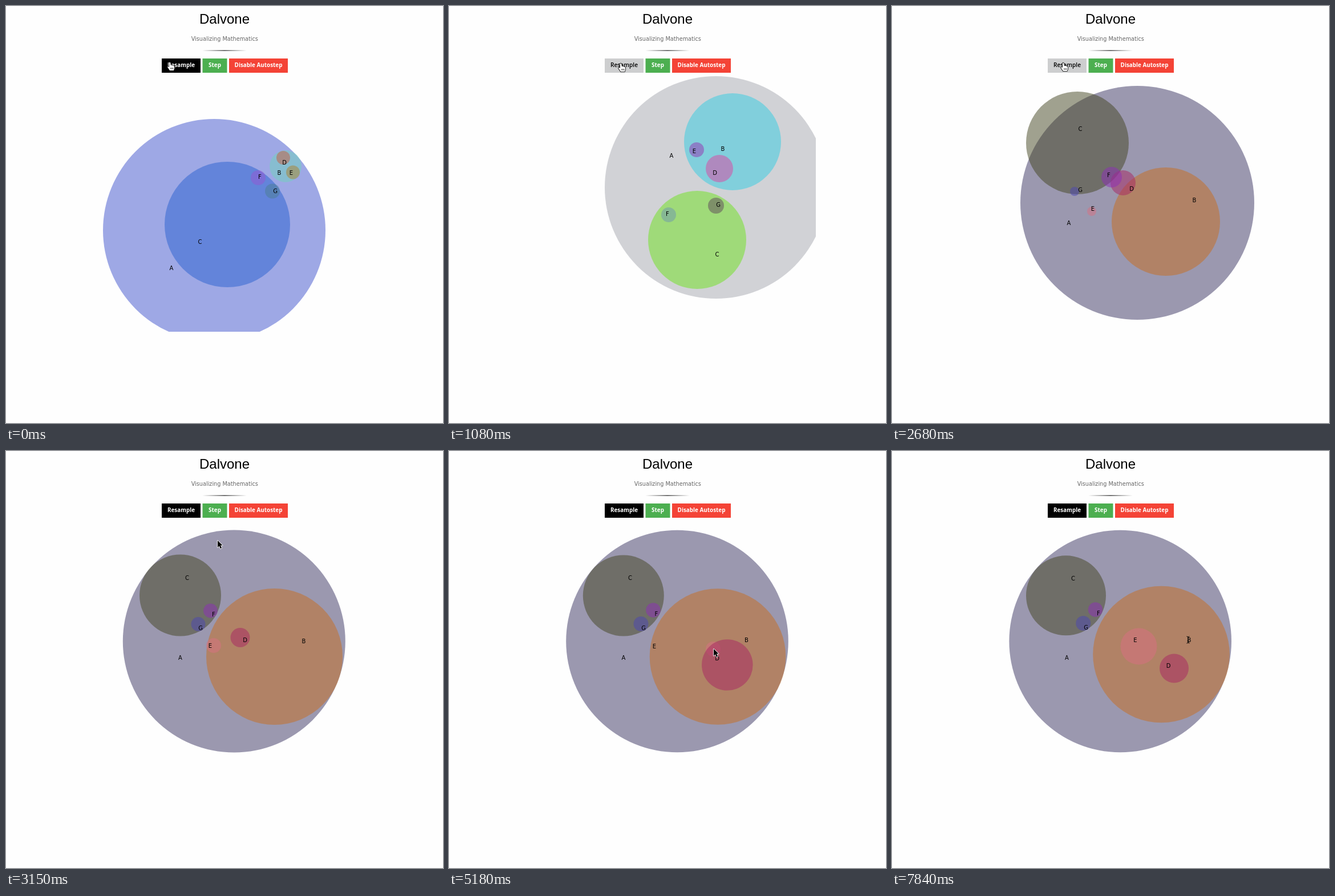
Animation of 766x731 px, one loop 8 s. Source, as an HTML page with a canvas:

```html
<!DOCTYPE html>
<html lang="en">
<head>
<meta charset="utf-8">
<title>Set diagrams</title>
<style>
html, body { margin: 0; width: 100%; height: 100%; overflow: hidden; background: #fefefe; }
canvas { display: block; }
</style>
</head>
<body>
<canvas id="stage" width="766" height="731"></canvas>
<script>
const ctx = document.getElementById('stage').getContext('2d');
const LOOP = 8000;
const ORDER = 'ABCEDFG';
const SANS = '"DejaVu Sans", sans-serif';
const BUTTON = '"Open Sans", sans-serif';

// Bursts of picture changes: first, last, count
const bursts = [
  [0, 0, 1], [50, 50, 1], [200, 630, 6], [720, 990, 4], [1080, 1080, 1], [1760, 2050, 4],
  [2680, 3070, 5], [3150, 3460, 5], [3520, 4280, 12], [4340, 4770, 8],
  [5010, 5120, 3], [5180, 5810, 10], [5870, 6480, 10], [6550, 6600, 2],
  [6690, 7490, 14], [7540, 7840, 6]
];

// Each set: circle x, y, radius, label x, y
const blueSet = {
  A: [365, 393, 195, 290, 459], B: [490, 281, 28, 479, 292], C: [388, 383, 110, 340, 413],
  D: [486, 266, 12, 488, 274], E: [503, 291.5, 12, 500, 292],
  F: [442, 301, 13, 445, 299], G: [467, 324.5, 13, 472, 324]
};
const greySet = {
  A: [481, 311, 204, 397, 251], B: [501, 243.5, 90, 470, 254], C: [448.5, 416.5, 98.5, 499.5, 442],
  D: [474.5, 302.5, 39.5, 451.5, 316], E: [414.5, 298, 4, 409, 304],
  F: [390.5, 318, 2, 387, 314], G: [483, 329.5, 18, 487.5, 318]
};
const greySolved = {
  A: [468, 318, 195, 390, 262], B: [497, 238, 85, 480, 250], C: [435, 410, 86, 470, 435],
  D: [474, 285, 24, 466, 292], E: [434, 252, 13, 430, 254],
  F: [385, 366, 13, 383, 364], G: [468, 350, 14, 472, 348]
};
const tealSet = {
  A: [280, 298, 218, 336, 409], B: [293, 348, 110, 308, 247], C: [358, 228.5, 152.5, 471, 197],
  D: [349, 436, 9.5, 353, 485], E: [246, 345, 0, 246, 345],
  F: [323, 203, 13.5, 312, 207], G: [351, 291.5, 67.5, 424, 271]
};
const tealSolved = {
  A: [331, 321, 195, 355, 460], B: [265, 365, 100, 280, 310], C: [400, 245, 75, 445, 225],
  D: [318, 405, 16, 320, 410], E: [235, 350, 13, 238, 349],
  F: [365, 222, 14, 360, 224], G: [412, 272, 30, 420, 272]
};
const brownSet = {
  A: [430, 345, 205, 310, 380], B: [480, 378, 95, 530, 340], C: [325, 240, 90, 330, 215],
  D: [405, 310, 22, 420, 320], E: [350, 360, 8, 352, 355],
  F: [385, 300, 18, 380, 296], G: [320, 325, 8, 330, 322]
};
const brownSolved = {
  A: [399.8, 333.5, 195, 305.5, 362], B: [470.5, 360.5, 119.5, 522, 333.5], C: [305.5, 253, 71.5, 317.5, 222.5],
  D: [410.5, 327, 17, 419, 331], E: [364, 341, 13, 358, 341.5],
  F: [358.5, 280, 12.5, 364, 286.5], G: [337, 303.5, 12.5, 341, 310.5]
};
const bigD = {
  ...brownSolved, A: [400, 333.5, 194.8, 306, 362], B: [471, 360.5, 119.3, 521.5, 331.5],
  C: [305.8, 253.5, 71, 317.5, 222.5], D: [487.8, 375, 44.8, 470, 363], E: [371, 342, 13, 360, 342.5],
  F: [358, 279, 12.8, 363.5, 285.5], G: [336.5, 303, 13, 341, 310]
};
const withE = (x, y, lx = 360, ly = 342.5) => ({ ...bigD, E: [x, y, 13, lx, ly] });
const dragE = [withE(434, 345), withE(463, 347), withE(480, 352), withE(446, 326, 443, 331)];
const apart = {
  ...bigD, A: [400.3, 333.5, 195, 306.5, 362], B: [470.5, 355.5, 122, 521.5, 331.5],
  C: [304.3, 252.5, 69.5, 317.5, 223], D: [492, 380.5, 30, 481, 373.5], E: [417.5, 300, 30.5, 417.5, 318],
  F: [357, 278.5, 11.7, 363, 285.5], G: [336, 301.5, 12, 340.5, 310]
};
const settled = {
  ...apart, A: [400.2, 333.5, 194.8, 306.5, 362], B: [472, 356.5, 119.8, 521, 331.5],
  C: [305, 253.3, 70, 317.5, 223], D: [494.5, 381, 25.5, 484.5, 376], E: [432.5, 342.5, 32, 426.5, 331],
  F: [356.5, 278, 12.7, 362, 284.5], G: [335.3, 302, 13, 340, 309]
};

// RGB per set, in the order A to G; every disc is half transparent
const blueTones = ['64,84,206', '115,211,188', '43,99,208', '199,92,59', '173,130,43', '149,86,209', '75,126,145'];
const greyTones = ['166,168,176', '50,205,227', '110,227,31', '222,68,161', '150,50,175', '110,150,175', '94,70,89'];
const tealTones = ['106,174,186', '156,110,108', '204,144,140', '20,140,175', '120,150,90', '112,135,188', '60,53,100'];
const brownTones = ['58,52,98', '200,111,30', '68,71,34', '168,38,99', '218,112,129', '142,46,183', '76,70,179'];

// start, end, from, to, ease-out power, tones
const moves = [
  [0, 1, blueSet, blueSet, 1, blueTones],
  [720, 1080, greySet, greySolved, 2, greyTones],
  [1760, 2050, tealSet, tealSolved, 2, tealTones],
  [2680, 3150, brownSet, brownSolved, 3, brownTones],
  [3460, 4160, brownSolved, bigD, 1, brownTones],
  [4280, 4770, bigD, dragE[0], 1, brownTones],
  [4950, 5180, dragE[0], dragE[1], 1, brownTones],
  [5180, 5450, dragE[1], dragE[2], 1, brownTones],
  [5450, 5810, dragE[2], dragE[3], 1, brownTones],
  [5810, 6550, dragE[3], apart, 2, brownTones],
  [6690, 7400, apart, settled, 1, brownTones]
];

// time, x, y of the pointer tip
const pointer = [
  [0, 287, 99], [200, 287, 99], [630, 302, 101], [720, 302, 102], [1080, 301, 101],
  [1760, 300, 100], [2680, 300, 100], [2950, 330, 110], [3150, 371, 157], [3460, 412, 328],
  [3520, 412, 328], [4100, 487, 376], [4280, 372, 341], [4770, 435, 345], [4950, 435, 345],
  [5180, 464, 347], [5450, 481, 352], [5810, 446, 326], [6200, 440, 315], [6550, 456, 300],
  [6690, 456, 300], [6850, 420, 302], [7200, 434, 344], [7490, 548, 331], [7840, 519, 331]
];

const clamp = u => Math.max(0, Math.min(1, u));
const mix = (a, b, u) => a.map((v, i) => v + (b[i] - v) * u);

function heldTime(t) {
  const [first, last, n] = bursts.filter(b => b[0] <= t).pop();
  if (n === 1) return first;
  const gap = (last - first) / (n - 1);
  return first + gap * Math.min(n - 1, Math.floor((t - first) / gap + 1e-6));
}

function pointerAt(t) {
  const i = pointer.findIndex(p => p[0] > t);
  if (i < 0) return pointer[pointer.length - 1].slice(1);
  const a = pointer[i - 1], b = pointer[i];
  return mix(a, b, (t - a[0]) / (b[0] - a[0])).slice(1);
}

function write(text, x, y, font, color) {
  ctx.font = font;
  ctx.fillStyle = color;
  ctx.fillText(text, x, y);
}

function drawHeader(hover) {
  write('Dalvone', 383, 31, '24px "Liberation Sans", Arial, sans-serif', '#000');
  write('Visualizing Mathematics', 383.3, 61, '9.7px ' + SANS, '#666');
  const line = ctx.createLinearGradient(344, 0, 422, 0);
  line.addColorStop(0, 'rgba(0,0,0,0)');
  line.addColorStop(0.5, 'rgba(0,0,0,.9)');
  line.addColorStop(1, 'rgba(0,0,0,0)');
  ctx.fillStyle = line;
  ctx.fillRect(344, 77.5, 78, 1.2);

  const button = (x, w, label, fill, color = '#fff', face = '700 9.9px ') => {
    ctx.fillStyle = fill;
    ctx.fillRect(x, 92, w, 25);
    write(label, x + w / 2, 107.3, face + BUTTON, color);
  };
  if (hover) button(273, 68, 'Resample', '#cdcecf', '#000', '600 10.2px ');
  else button(273, 68, 'Resample', '#000');
  button(344.5, 43, 'Step', '#4caf50');
  button(391, 103, 'Disable Autostep', '#f44336');
}

function drawSets(t) {
  const [start, end, from, to, power, tones] = moves.filter(m => m[0] <= t).pop();
  const u = 1 - (1 - clamp((t - start) / (end - start))) ** power;
  ctx.save();
  ctx.beginPath();
  ctx.rect(124, 117, 519, 454);
  ctx.clip();
  for (const name of ORDER) {
    const [x, y, r, lx, ly] = mix(from[name], to[name], u);
    ctx.fillStyle = `rgba(${tones['ABCDEFG'.indexOf(name)]},.5)`;
    ctx.beginPath();
    ctx.arc(x, y, r, 0, Math.PI * 2);
    ctx.fill();
    write(name, lx, ly + 3.5, '10px ' + SANS, '#000');
  }
  ctx.restore();
}

function outline(d, x, y, fill, stroke, width) {
  const path = new Path2D(d);
  ctx.save();
  ctx.translate(x, y);
  ctx.lineJoin = 'round';
  ctx.lineWidth = width;
  ctx.strokeStyle = stroke;
  ctx.stroke(path);
  ctx.fillStyle = fill;
  ctx.fill(path);
  ctx.restore();
}

function drawHand(x, y) {
  outline('M-1 0Q0-1 1 0L2 5L4 4.5L5.5 5.5L7 5.5L8 7Q9 10 7 14H0L-4 8Q-3 6-1 8Z', x, y, '#fff', '#000', 1.6);
  ctx.fillStyle = '#000';
  for (const dx of [1.5, 3.5, 5.5]) ctx.fillRect(x + dx, y + 9, 0.7, 3);
}

function drawArrow(x, y) {
  outline('M0 0V12L2.8 9.4L4.8 14L7 13L5 8.6H8.6Z', x, y, '#000', '#fff', 1.6);
}

function drawBeam(x, y) {
  ctx.lineWidth = 1;
  ctx.strokeStyle = '#000';
  ctx.stroke(new Path2D(`M${x - 2.5} ${y - 6}Q${x} ${y - 6} ${x} ${y - 4}V${y + 4}Q${x} ${y + 6} ${x - 2.5} ${y + 6}`
    + `M${x + 2.5} ${y - 6}Q${x} ${y - 6} ${x} ${y - 4}M${x} ${y + 4}Q${x} ${y + 6} ${x + 2.5} ${y + 6}`
    + `M${x - 1.5} ${y + 2}H${x + 1.5}`));
}

function draw(now) {
  const t = heldTime(now % LOOP);
  const [x, y] = pointerAt(t);
  const overButton = y < 117;
  ctx.fillStyle = '#fefefe';
  ctx.fillRect(0, 0, 766, 731);
  ctx.textAlign = 'center';
  drawHeader(overButton && t >= 50);
  drawSets(t);
  if (overButton) drawHand(x, y);
  else if (t > 7700) drawBeam(x, y);
  else drawArrow(x, y);
}

const begin = performance.now();
function tick() {
  draw(performance.now() - begin);
  requestAnimationFrame(tick);
}
tick();
</script>
</body>
</html>
```
